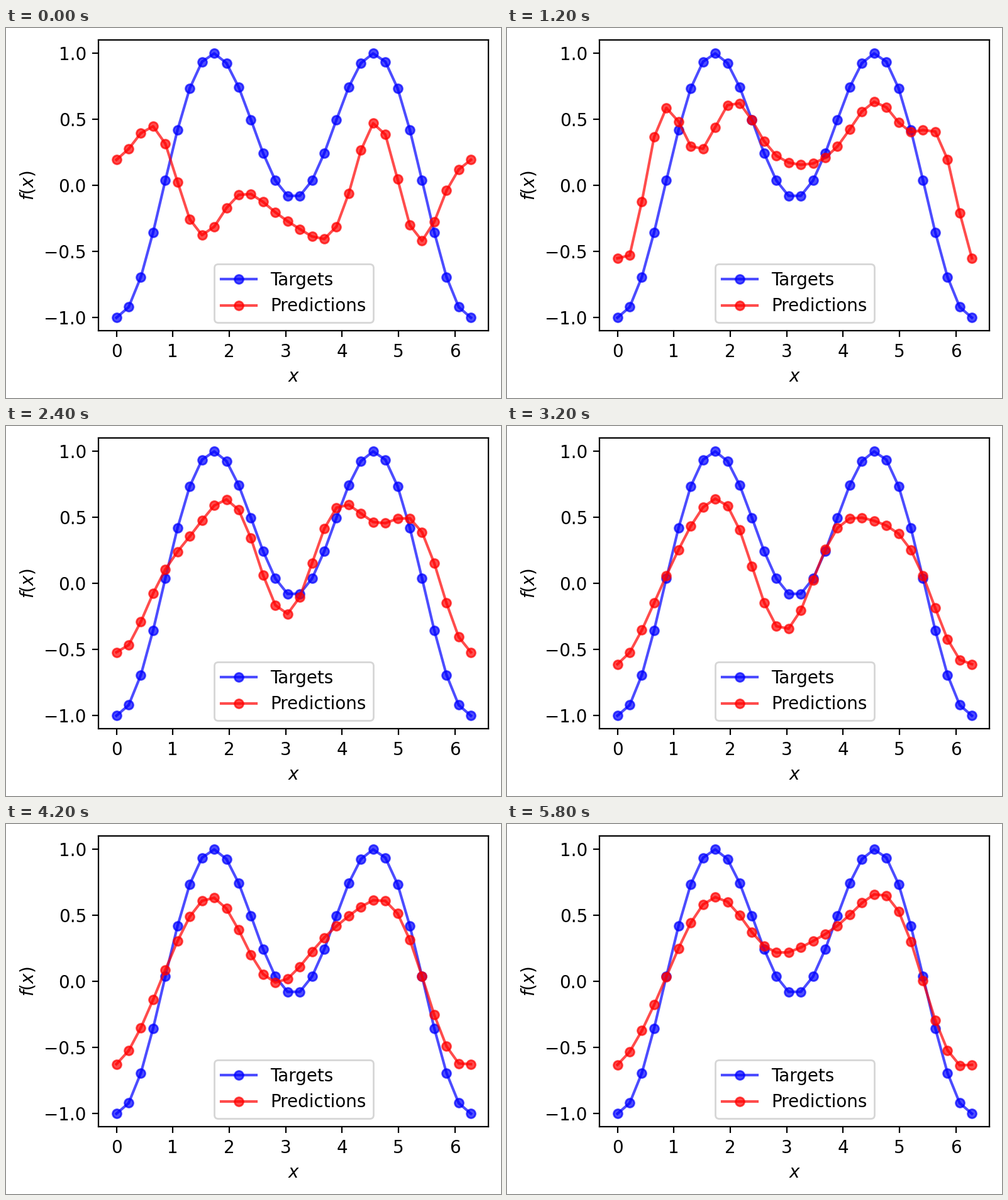
Write a matplotlib script that moves like this. It is 787 px wide and 588 px high and loops after 6000 ms.

```python
import numpy as np
import matplotlib.pyplot as plt
from matplotlib.animation import FuncAnimation

W, H, DPI = 787, 588, 200
FRAMES, STEP_MS = 30, 200

plt.rcParams["font.family"] = "DejaVu Sans"

x = np.linspace(0, 2 * np.pi, 30)
wave = -0.6 * np.cos(x) - np.cos(2 * x)
target = 2 * (wave - wave.min()) / (wave.max() - wave.min()) - 1


def series(*keys):
    """Fourier series through an odd number of evenly spaced key points."""
    coef = np.fft.rfft(keys) / len(keys)
    coef[1:] *= 2
    return np.real(np.exp(1j * np.outer(x, np.arange(coef.size))) @ coef)


# Step of the training -> fitted curve, from rough to smooth.
stages = {
    0: series(.195, .42, .195, -.36, -.18, -.07, -.23,
              -.365, -.335, .29, .3, -.4, -.09),
    6: series(-.55, 0, .57, .26, .6, .47, .2,
              .16, .28, .57, .56, .405, .27),
    12: series(-.52, -.03, .41, .6, -.145, .185, .58, .475, .215),
    16: series(-.61, -.1, .505, .48, -.31, .055, .5, .41, -.13),
    21: series(-.625, -.087, .555, .45, -.005, .24, .52, .57, -.19),
    24: series(-.643, -.107, .53, .525, .19, .25, .485, .615, -.15),
    29: series(-.63, -.13, .515, .54, .222, .312, .535, .6, -.23),
}
steps = list(stages)
curves = np.array(list(stages.values()))


def prediction(i):
    return [np.interp(i, steps, values) for values in curves.T]


fig = plt.figure(figsize=(W / DPI, H / DPI), dpi=DPI, facecolor="white")
ax = fig.add_axes([147.4 / W, 106.6 / H, 620 / W, 462 / H])
style = dict(marker="o", markersize=5, alpha=0.7)
ax.plot(x, target, color="blue", label="Targets", **style)
pred, = ax.plot(x, curves[0], color="red", label="Predictions", **style)
ax.set_xlabel("$x$")
ax.set_ylabel("$f(x)$")
ax.set_ylim(-1.1, 1.1)
ax.legend(loc="lower center")


def update(i):
    pred.set_ydata(prediction(i))
    return pred,


anim = FuncAnimation(fig, update, frames=FRAMES, interval=STEP_MS,
                     repeat=True, repeat_delay=0)
plt.show()
```
